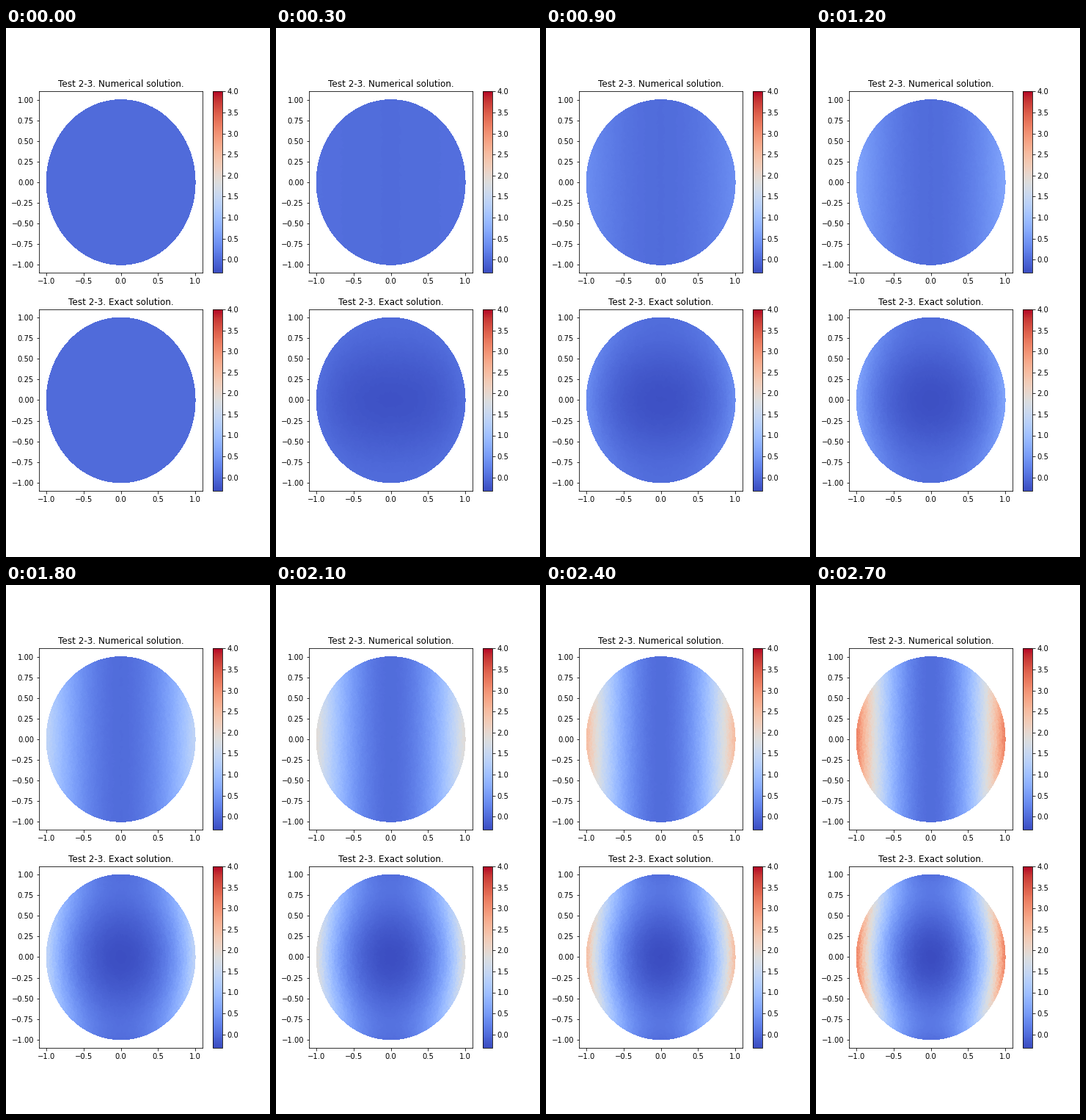
Write a matplotlib script that moves like this. It is 360x720 px and loops after 3000 ms.

```python
import numpy as np
import matplotlib.pyplot as plt
from matplotlib.animation import FuncAnimation
from matplotlib.tri import Triangulation

FRAMES = 10
INTERVAL = 300
RINGS = 25
VMIN, VMAX = -0.32, 4.0

plt.rcParams.update({
    "font.family": "DejaVu Sans",
    "font.size": 10,
    "figure.subplot.bottom": 0.125,
    "figure.subplot.top": 0.88,
})


def disc_mesh(rings):
    """Unstructured triangulation of the unit disc."""
    rng = np.random.default_rng(4)
    x, y = [np.zeros(1)], [np.zeros(1)]
    for i in range(1, rings + 1):
        n = 6 * i
        angle = 2 * np.pi * np.arange(n) / n
        radius = np.full(n, i / rings)
        if i < rings:
            angle += rng.uniform(0, 2 * np.pi) + rng.uniform(-0.22, 0.22, n) / i
            radius += rng.uniform(-0.22, 0.22, n) / rings
        x.append(radius * np.cos(angle))
        y.append(radius * np.sin(angle))
    return Triangulation(np.concatenate(x), np.concatenate(y))


def numerical(x, y, t):
    return 4 * x**2 * t**2


def exact(x, y, t):
    u = numerical(x, y, t)
    if t == 0:
        return u
    depth = 0.25 + 0.07 * t
    wide = (0.15 + 1.6 * t**2) * x**2
    tall = (0.23 + 1.0 * t**2) * y**2
    return u - (1 - x**2 - y**2) * (depth + wide - tall)


mesh = disc_mesh(RINGS)


def cell_values(func, t):
    return func(mesh.x, mesh.y, t)[mesh.triangles].mean(axis=1)


def add_panel(ax, name, func):
    field = ax.tripcolor(mesh, facecolors=cell_values(func, 0),
                         cmap="coolwarm", vmin=VMIN, vmax=VMAX)
    ax.set(xlim=(-1.1, 1.1), ylim=(-1.1, 1.1))
    ax.set_title(f"Test 2-3. {name} solution.")
    fig.colorbar(field, ax=ax)
    return field


fig, axes = plt.subplots(2, 1, figsize=(5, 10), dpi=72)
panels = [
    (add_panel(axes[0], "Numerical", numerical), numerical),
    (add_panel(axes[1], "Exact", exact), exact),
]


def update(frame):
    t = frame / FRAMES
    for field, func in panels:
        field.set_array(cell_values(func, t))
    return [field for field, _ in panels]


anim = FuncAnimation(fig, update, frames=FRAMES, interval=INTERVAL, repeat=True)
plt.show()
```
